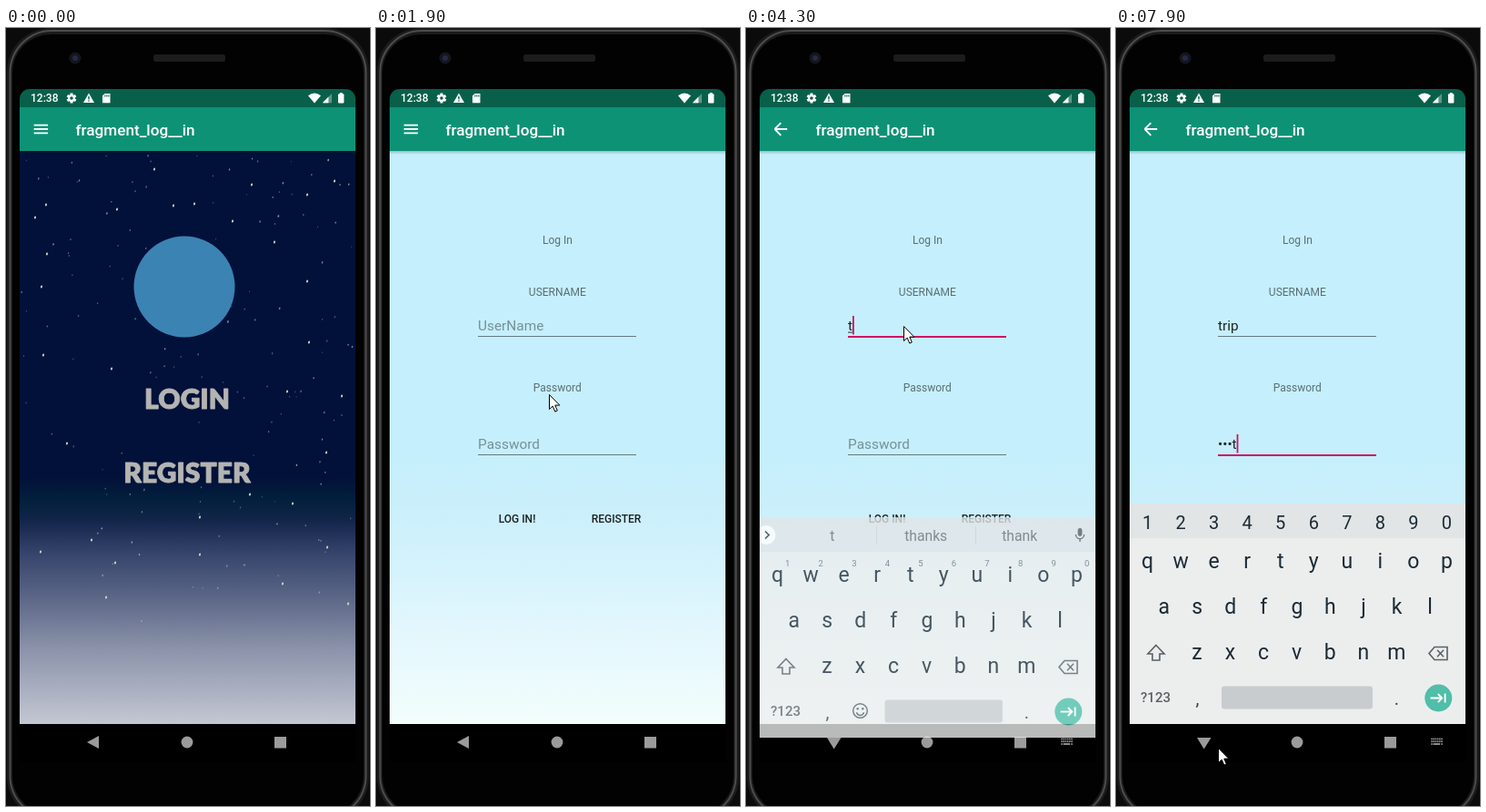
Recreate the animation shown at these times as an HTML page with a canvas. Size 400 by 854 pixels, loop 8000 ms.

```html
<!DOCTYPE html>
<html lang="en">
<head>
<meta charset="utf-8">
<title>Log in demo</title>
<style>
  html, body { margin: 0; width: 100%; height: 100%; overflow: hidden; background: #000; }
  canvas { display: block; width: 400px; height: 854px; }
</style>
</head>
<body>
<canvas id="stage" width="400" height="854"></canvas>
<script>
const main = document.getElementById('stage').getContext('2d');
let ctx = main;
const LOOP = 8000, STEP = 100;
const PINK = '#cc1464';
const PAGE_AT = 1900, FOCUS_AT = 3400, KEYS_AT = 4200, TAB_AT = 5200, SECRET_AT = 5500;
const USER = 'trip', USER_KEYS = [4200, 4500, 4700, 4900];
const SECRET = 'coat', SECRET_KEYS = [5900, 6200, 6500, 6900];
const HINTS = [['t', 'thanks', 'thank'], ['tr', 'try', 'true'],
  ['tri', 'trip', 'tried'], ['trip', 'tripping', 'trips']];

// pointer: time, x, y of the tip
const POINTER = [[600, 96, 768], [1000, 130, 434], [1200, 130, 434], [1700, 190, 402],
  [2300, 190, 402], [2900, 173, 327], [7300, 173, 327], [7700, 112, 803], [7900, 112, 790]];

// the large stars, x and y in turn
const BRIGHT = [163,155, 44,194, 122,199, 184,195, 207,193, 249,212, 270,172, 361,168,
  331,183, 32,208, 295,235, 45,248, 331,278, 39,284, 41,359, 116,374, 333,345, 309,399,
  369,404, 67,456, 352,466, 315,522, 268,512, 213,537, 213,578, 38,575, 94,562, 120,587,
  110,625, 304,610, 353,570, 376,632];

const lerp = (a, b, p) => a + (b - a) * p;
const clamp = v => Math.max(0, Math.min(1, v));
const count = (times, t) => times.filter(k => t >= k).length;

function rect(x, y, w, h, color) {
  ctx.fillStyle = color;
  ctx.fillRect(x, y, w, h);
}

function round(x, y, w, h, r, color) {
  ctx.fillStyle = color;
  ctx.beginPath();
  ctx.roundRect(x, y, w, h, r);
  ctx.fill();
}

function disc(x, y, r, color) {
  ctx.fillStyle = color;
  ctx.beginPath();
  ctx.arc(x, y, r, 0, 7);
  ctx.fill();
}

function trace(points, close) {
  ctx.beginPath();
  for (let i = 0; i < points.length; i += 2) ctx.lineTo(points[i], points[i + 1]);
  if (close) ctx.closePath();
}

function poly(points, color) {
  trace(points, true);
  ctx.fillStyle = color;
  ctx.fill();
}

function line(points, color, width = 1.5, close = false) {
  trace(points, close);
  ctx.strokeStyle = color;
  ctx.lineWidth = width;
  ctx.stroke();
}

function text(str, x, y, size, color, weight = 400, align = 'center', family = 'Roboto') {
  ctx.font = `${weight} ${size}px ${family}, sans-serif`;
  ctx.textAlign = align;
  ctx.fillStyle = color;
  ctx.fillText(str, x, y);
}

function fade(y0, y1, ...stops) {
  const g = ctx.createLinearGradient(0, y0, 0, y1);
  for (const [at, color] of stops) g.addColorStop(at, color);
  return g;
}

function phone() {
  rect(0, 0, 400, 854, '#0b0b0b');
  round(1, 0, 398, 870, 48, '#1b1b1b');
  ctx.lineWidth = 2;
  ctx.strokeStyle = '#4c4c4c';
  ctx.beginPath();
  ctx.roundRect(4.5, 3, 391, 864, 46);
  ctx.stroke();
  round(7, 7, 386, 856, 42, '#020202');
  round(162, 29, 79, 8, 2.5, '#1c1c1c');
  disc(76, 33, 6.5, '#15161c');
  disc(76, 33, 3, '#252a49');
}

function statusBar() {
  const back = '#08604a';
  rect(15, 67, 369, 20, back);
  text('12:38', 27, 81.3, 12, '#fff', 500, 'left');
  ctx.save();
  ctx.translate(72, 77);
  for (let i = 0; i < 6; i++) {
    ctx.rotate(Math.PI / 3);
    rect(-1.5, -5.4, 3, 3, '#fff');
  }
  ctx.restore();
  disc(72, 77, 4, '#fff');
  disc(72, 77, 1.8, back);
  poly([91, 71.5, 97, 82, 85, 82], '#fff');
  rect(90.3, 75, 1.4, 3.4, back);
  rect(90.3, 79.4, 1.4, 1.3, back);
  poly([108.5, 72, 114.5, 72, 114.5, 82.3, 106, 82.3, 106, 74.5], '#fff');
  for (let i = 0; i < 3; i++) rect(108.4 + i * 2, 73.3, 1, 2.3, back);
  ctx.fillStyle = '#fff';
  ctx.beginPath();
  ctx.moveTo(339, 82.5);
  ctx.lineTo(332, 74.2);
  ctx.quadraticCurveTo(339, 69, 346, 74.2);
  ctx.fill();
  poly([358, 72, 358, 82.3, 347.8, 82.3], '#5a9585');
  poly([354.4, 75.6, 354.4, 82.3, 347.8, 82.3], '#fff');
  round(365, 72.3, 6.4, 10.2, 1, '#fff');
  rect(366.8, 71, 2.8, 2, '#fff');
}

// menu bars turning into a back arrow, p from 0 to 1
function menuIcon(p) {
  const u = 0.857, len = lerp(18, 16, p) * u, gap = lerp(5, 0, p) * u;
  const edge = lerp(18, 11.3, p) * u, turn = p * Math.PI / 4;
  const w = edge * Math.cos(turn), h = edge * Math.sin(turn), x = -len / 2;
  ctx.save();
  ctx.translate(38.4, 111);
  ctx.rotate((p - 1) * Math.PI);
  line([x + p, 0, -x, 0], '#fff', 1.8);
  line([x, gap, x + w, gap + h], '#fff', 1.8);
  line([x, -gap, x + w, -gap - h], '#fff', 1.8);
  ctx.restore();
}

function appBar(t) {
  rect(15, 135, 369, 4, fade(135, 139, [0, 'rgba(0,0,0,.2)'], [1, 'rgba(0,0,0,0)']));
  rect(15, 87, 369, 48, '#0d9276');
  menuIcon(clamp((t - PAGE_AT) / 400));
  text('fragment_log__in', 76.5, 117.6, 17.14, '#fff', 500, 'left');
}

function star(x, y, size, alpha) {
  ctx.globalAlpha = alpha;
  ctx.fillStyle = '#cfe8c8';
  ctx.beginPath();
  ctx.ellipse(x, y, size * 0.8, size * 1.25, 0.25, 0, 7);
  ctx.fill();
  ctx.globalAlpha = 1;
}

function stars() {
  let seed = 71;
  const rnd = () => (seed = (seed * 16807) % 2147483647) / 2147483647;
  for (let i = 0; i < 150; i++) {
    const x = 17 + rnd() * 364, y = 140 + Math.pow(rnd(), 1.15) * 520;
    star(x, y, 0.5 + rnd() * 0.6, 0.25 + rnd() * 0.45);
  }
  for (let i = 0; i < BRIGHT.length; i += 2) star(BRIGHT[i], BRIGHT[i + 1], 1.3, 0.9);
}

function startPage() {
  rect(15, 135, 369, 629, fade(135, 764, [0, '#02113a'], [0.57, '#021139'], [0.61, '#03203d'],
    [0.645, '#13254a'], [0.70, '#35436b'], [0.78, '#5c6787'], [0.87, '#8c93aa'], [1, '#c4c8d3']));
  stars();
  disc(196, 284, 55.5, '#3b83b3');
  for (const [label, y] of [['LOGIN', 418], ['REGISTER', 499]]) {
    text(label, 199, y, 30, '#b4b4b2', 900, 'center', 'Lato');
    ctx.lineJoin = 'round';
    ctx.lineWidth = 0.8;
    ctx.strokeStyle = '#b4b4b2';
    ctx.strokeText(label, 199, y);
    ctx.lineJoin = 'miter';
  }
}

function field(y, value, hint, focused, since, t, composing) {
  const color = value ? 'rgba(0,0,0,.85)' : 'rgba(0,0,0,.4)';
  text(value || hint, 112, y, 15.4, color, 400, 'left');
  const end = 112 + (value ? ctx.measureText(value).width : 0);
  if (value && composing) rect(112, y + 1.6, end - 112, 1, '#2a3337');
  if (!focused) {
    rect(112, y + 6, 174, 1, '#66797f');
    return;
  }
  rect(112, y + 6, 174, 2, PINK);
  if (Math.floor((t - since) / 500) % 2 === 0) rect(end, y - 16, 1.8, 20.5, PINK);
}

function loginPage(t) {
  rect(15, 135, 369, 629, fade(135, 764, [0, '#c5effc'], [0.53, '#c5effc'], [0.6, '#c9effb'],
    [0.72, '#d3f2fc'], [0.82, '#e1f6fd'], [1, '#f3fefc']));
  const grey = 'rgba(0,0,0,.54)', ink = 'rgba(0,0,0,.87)';
  text('Log In', 199.5, 236.6, 12, grey);
  text('USERNAME', 199.3, 293.6, 12, grey);
  text('Password', 199.3, 399.4, 12, grey);

  const n = count(USER_KEYS, t), m = count(SECRET_KEYS, t);
  const inSecret = t >= TAB_AT;
  const since = n ? USER_KEYS[n - 1] : FOCUS_AT;
  field(332, USER.slice(0, n), 'UserName', t >= FOCUS_AT && !inSecret, since, t, !inSecret);
  const secret = m ? '•'.repeat(m - 1) + SECRET[m - 1] : '';
  field(462, secret, 'Password', inSecret, m ? SECRET_KEYS[m - 1] : TAB_AT, t, false);

  text('LOG IN!', 155, 543, 12, ink, 500);
  text('REGISTER', 264, 543, 12, ink, 500);
}

function navBar(open) {
  const grey = '#9b9b9b';
  rect(15, 764, 369, 42, '#000');
  if (open) {
    poly([89, 779, 104.5, 779, 96.7, 791.5], grey);
    for (let r = 0; r < 3; r++)
      for (let c = 0; c < 6; c++)
        if (r < 2 || c === 0 || c === 5) rect(346.3 + c * 2.2, 779.5 + r * 2.8, 1.5, 1.8, grey);
    rect(348.6, 785.1, 7.5, 1.8, grey);
  } else {
    poly([89, 784, 102, 777, 102, 791], grey);
  }
  disc(199, 784, 6.4, grey);
  rect(295, 778, 13, 12.5, grey);
}

function suggestions(words) {
  ctx.save();
  ctx.beginPath();
  ctx.rect(15, 522, 369, 38);
  ctx.clip();
  disc(22, 541.5, 10.5, '#fff');
  ctx.restore();
  line([21, 537.5, 25.2, 541.5, 21, 545.5], '#333c40', 1.7);
  words.forEach((w, i) => text(w, 94.7 + i * 103, 547.5, 15.7, '#697176'));
  rect(143, 532, 1, 20, '#cfd3d5');
  rect(252, 532, 1, 20, '#cfd3d5');
  round(364.6, 534, 4.8, 9, 2.4, '#596166');
  ctx.strokeStyle = '#596166';
  ctx.lineWidth = 1.4;
  ctx.beginPath();
  ctx.arc(367, 541, 4.6, 0, Math.PI);
  ctx.stroke();
  rect(366.3, 545.5, 1.4, 3.5, '#596166');
}

function keyRow(keys, x, y, size = 23) {
  [...keys].forEach((k, i) => text(k, x + i * 36.55, y, size, '#1b2b36'));
}

function keyIcons() {
  const c = '#596166';
  line([44, 677.5, 53, 687, 48, 687, 48, 694, 40, 694, 40, 687, 35, 687], c, 1.6, true);
  line([344, 686.5, 350, 679.5, 364, 679.5, 364, 693.5, 350, 693.5], c, 1.6, true);
  line([353, 682.8, 360, 690.2], c, 1.6);
  line([360, 682.8, 353, 690.2], c, 1.6);
  disc(354.3, 735.5, 15, '#50bea9');
  line([345.5, 735.5, 358, 735.5], '#fff', 1.8);
  line([353.8, 731, 358.3, 735.5, 353.8, 740], '#fff', 1.8);
  line([361.6, 730.5, 361.6, 740.5], '#fff', 1.8);
}

function smiley() {
  const c = '#596166';
  ctx.strokeStyle = c;
  ctx.lineWidth = 1.5;
  ctx.beginPath();
  ctx.arc(125.5, 734.5, 7.8, 0, 7);
  ctx.stroke();
  disc(122.7, 732.3, 1.2, c);
  disc(128.3, 732.3, 1.2, c);
  ctx.beginPath();
  ctx.arc(125.5, 735.2, 4.2, 0.25, Math.PI - 0.25);
  ctx.stroke();
}

function drawKeys(t) {
  const secret = t >= SECRET_AT;
  rect(15, 522, 369, 242, '#eceeee');
  rect(15, 522, 369, 38, '#e2e5e6');
  if (secret) keyRow('1234567890', 34.5, 549.8, 20);
  else {
    suggestions(HINTS[count(USER_KEYS, t) - 1]);
    [...'1234567890'].forEach((d, i) => text(d, 45.7 + i * 36.55, 576, 9.5, '#6e767a'));
  }
  keyRow('qwertyuiop', 34.5, 593);
  keyRow('asdfghjkl', 52.7, 643);
  keyRow('zxcvbnm', 89, 693.3);
  text('?123', 43.5, 740.3, 15, '#596166', 500);
  text(',', 89.5, 743, 20, '#3c464b');
  text('.', 308.5, 743, 20, '#3c464b');
  const left = secret ? 116 : 152.5;
  round(left, 722.5, 282 - left, 25, 3, '#c8cccf');
  if (!secret) smiley();
  keyIcons();
}

// the keyboard fades in as one sheet, so it is drawn apart
const sheet = document.createElement('canvas');
sheet.width = 400;
sheet.height = 854;
const sheetCtx = sheet.getContext('2d');

function keyboard(t) {
  const k = 1 - clamp((t - KEYS_AT) / 250);
  if (k === 0) {
    drawKeys(t);
    return;
  }
  ctx = sheetCtx;
  ctx.clearRect(0, 0, 400, 854);
  drawKeys(t);
  ctx = main;
  ctx.globalAlpha = 1 - k ** 3;
  ctx.drawImage(sheet, 0, Math.round(42 * k * k));
  ctx.globalAlpha = 1;
}

function pointer(t) {
  if (t < POINTER[0][0]) return;
  let i = 0;
  while (i < POINTER.length - 2 && t >= POINTER[i + 1][0]) i++;
  const [t0, x0, y0] = POINTER[i], [t1, x1, y1] = POINTER[i + 1];
  let p = clamp((t - t0) / (t1 - t0));
  p = p * p * (3 - 2 * p);
  ctx.save();
  ctx.translate(Math.round(lerp(x0, x1, p)) + 0.5, Math.round(lerp(y0, y1, p)) + 0.5);
  const shape = [0, 0, 0, 16, 3.7, 12.6, 6.3, 18.6, 8.8, 17.5, 6.3, 11.6, 11.3, 11.6];
  poly(shape, '#fff');
  line(shape, '#000', 1, true);
  ctx.restore();
}

function draw(t) {
  const open = t >= KEYS_AT;
  phone();
  ctx.save();
  ctx.beginPath();
  ctx.roundRect(15, 67, 369, 740, [11, 11, 0, 0]);
  ctx.clip();
  if (t < PAGE_AT) startPage();
  else loginPage(t);
  statusBar();
  appBar(t);
  navBar(open);
  if (open) keyboard(t);
  ctx.restore();
  pointer(t);
}

const start = performance.now();
function tick() {
  const t = (performance.now() - start) % LOOP;
  draw(Math.floor(t / STEP) * STEP);
  requestAnimationFrame(tick);
}
tick();
</script>
</body>
</html>
```
